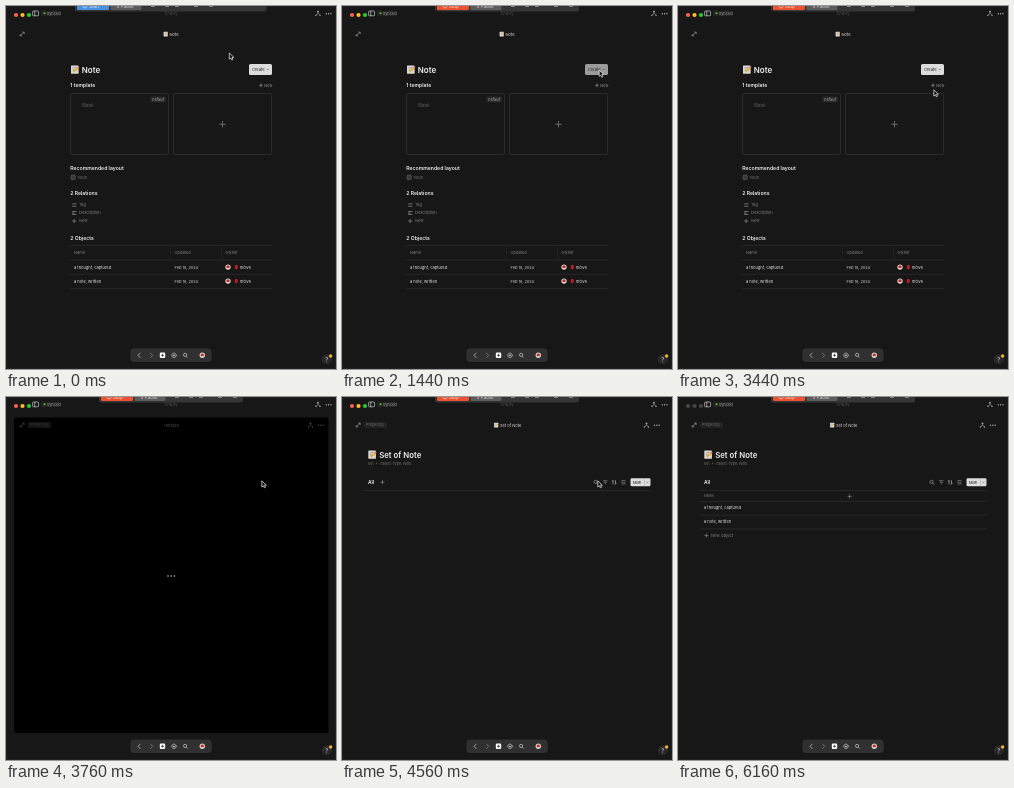
Write an HTML page that moves like this. It is 330 px wide and 363 px high and loops after 6.24 s.

```html
<!DOCTYPE html>
<html lang="en">
<head>
<meta charset="utf-8">
<title>Notes</title>
<style>
html, body { margin: 0; width: 100%; height: 100%; overflow: hidden; background: #171717; }
svg { display: block; width: 330px; height: 363px; font-family: Inter, sans-serif; }
text { white-space: pre; }
</style>
</head>
<body>
<svg id="stage" viewBox="0 0 330 363"></svg>
<script>
const LOOP = 6240, STEP = 80;
const stage = document.getElementById('stage');

const text = (x, y, s, size = 4, fill = '#888', more = '') =>
  `<text x="${x}" y="${y}" font-size="${size}" fill="${fill}" ${more}>${s}</text>`;
const bold = (x, y, s, size = 5.1) => text(x, y, s, size, '#eee', 'font-weight="600"');
const rect = (x, y, w, h, fill, r = 0, more = '') =>
  `<rect x="${x}" y="${y}" width="${w}" height="${h}" rx="${r}" fill="${fill}" ${more}/>`;
const dot = (x, y, r, fill, more = '') => `<circle cx="${x}" cy="${y}" r="${r}" fill="${fill}" ${more}/>`;
const line = (d, color = '#888', w = .7) => `<path d="${d}" fill="none" stroke="${color}" stroke-width="${w}"/>`;
const rule = (x1, x2, y) => line(`M${x1} ${y}H${x2}`, '#2b2b2b', .8);
const plus = (x, y, r, color) => line(`M${x - r} ${y}h${2 * r}M${x} ${y - r}v${2 * r}`, color);
const dots = (x, y, color) => [0, 2.3, 4.6].map(d => dot(x + d, y, .7, color)).join('');
const group = (id, body) => `<g id="${id}">${body}</g>`;

const memo = (x, y, s) => `<g transform="translate(${x} ${y}) scale(${s / 9})">` +
  rect(.5, .5, 7.6, 8.3, '#ddd9d2', .6) + line('M2 2.4h4M2 4h3M2 5.6h2', '#8b8b8b', .6) +
  line('M3.2 7L7.7 2.6', '#e9a82c', 1.7) + line('M7.2 3L8.3 2', '#e66a62', 1.7) + '</g>';
const tree = (x, y, color) => line(`M${x} ${y - 1.5}V${y}L${x - 2} ${y + 2}M${x} ${y}L${x + 2} ${y + 2}`, color, .6) +
  dot(x, y - 1.6, .9, color) + dot(x - 2, y + 2, .7, color) + dot(x + 2, y + 2, .7, color);
const search = (x, y, color) => dot(x - .4, y - .4, 1.6, 'none', `stroke="${color}" stroke-width=".7"`) +
  line(`M${x + .8} ${y + .8}l1.5 1.5`, color);
const avatar = (x, y) => dot(x, y, 2.7, '#d9cfc4') + dot(x, y - .2, 1.6, '#c22a2a') + rect(x - 1, y + 1, 2, 1, '#efe6da');
const chevron = (x, y, color) => line(`M${x - 1} ${y - .5}l1 1l1-1`, color, .6);
const expand = line('M14.4 29.7L18 26.3M16.3 26.1h1.9v1.9M14.2 28v1.9h1.9', '#aaa', .6);

function toolbar(id, x, end, color, label) {
  return group(id, rect(x - 2, -5, end - x + 2, 10.5, '#363636', 2.5) + rect(x, -5, 32, 9, color, 1.5) +
    rect(x + 33.5, -5, 31, 9, '#5c5c5c', 1.5) + dot(x + 8, .2, 1.8, 'none', 'stroke="#eee" stroke-width=".6"') +
    text(x + 12, 1.6, label, 4.5, '#eee') + text(x + 40, 1.6, 'II Pause', 4.5, '#ddd') +
    [74, 88, 98, 117, 132].map(d => rect(x + d, -1, 4, 2, '#888')).join(''));
}

const windowBar =
  rect(.25, .25, 329.5, 362.5, 'none', 3, 'stroke="#303030" stroke-width=".6"') +
  ['#ff5f57', '#febc2e', '#28c840'].map((c, i) => dot(10 + i * 6.5, 9, 2.1, c, 'class="light"')).join('') +
  rect(26.6, 5, 6, 4.8, 'none', 1, 'stroke="#ccc" stroke-width=".7"') + line('M28.8 5v5', '#ccc') +
  rect(35, 4.7, 20, 5.2, '#242424', 1.2) + dot(38.5, 7.3, 1, '#5bc20f') + text(40.7, 8.7, 'Synced', 3.9, '#999') +
  text(158.5, 9, 'Empty', 4.4, '#4b4b4b') + tree(312, 7.3, '#aaa') + dots(320.3, 7.7, '#aaa');

const notePage = expand + memo(157.3, 25.5, 5) + text(163.5, 29.6, 'Note', 4.1, '#ddd') +
  memo(64.5, 59, 9) + bold(75.8, 66.8, 'Note', 8) +
  rect(243, 58, 23, 11, '#dcdcdc', 1.5, 'id="create"') + text(246, 65, 'Create', 4, '#222') + chevron(261.7, 63.5, '#555') +
  bold(64.3, 81.2, '1 template') + plus(255, 79.3, 2, '#888') + text(258.2, 80.8, 'New', 3.9) +
  [64.5, 167.5].map(x => rect(x, 87.5, 98, 61, 'none', 1.5, 'stroke="#303030" stroke-width=".8"')).join('') +
  text(76, 101.3, 'Blank', 4.4, '#606060') + rect(144.5, 90.5, 15.5, 6, '#292929', 1) +
  text(146, 94.8, 'Default', 3.7, '#999') + plus(216.5, 118.3, 3.3, '#888') +
  bold(64.3, 163.6, 'Recommended layout') +
  rect(65.2, 169.2, 4, 4.2, 'none', .8, 'stroke="#888" stroke-width=".6"') + line('M66.2 170.8h2M66.2 172h2', '#888', .5) +
  text(72, 172.8, 'Note', 4, '#707070') + bold(64.3, 189.4, '2 Relations') +
  line('M66.2 197.5h4.2M66.2 199h4.2M66.2 200.5h4.2', '#777', .6) + line('M66 205.5h4.5M66 207h3M66 208.5h4.5', '#888') +
  plus(68.2, 215, 2.1, '#888') + ['Tag', 'Description', 'New'].map((s, i) => text(73, 200.4 + i * 8, s, 4, '#808080')).join('') +
  bold(64.3, 234, '2 Objects') + [239.5, 254, 268.2, 282.6].map(y => rule(64, 266, y)).join('') +
  line('M164.5 241v12M215.3 241v12', '#242424') +
  [['Name', 68], ['Updated', 168.5], ['Owner', 219.3]].map(([s, x]) => text(x, 248.3, s, 4, '#808080')).join('') +
  ['a thought, captured', 'a note, written'].map((s, i) => {
    const y = 262.6 + i * 14;
    return text(68, y, s, 4, '#e2e2e2') + text(168.5, y, 'Feb 16, 2024', 3.9, '#ccc') + avatar(222, y - 1.5) +
      `<ellipse cx="230.3" cy="${y - 1.5}" rx="1.6" ry="2.4" fill="#b51d25"/>` + text(233.7, y, 'mólve', 4, '#ddd');
  }).join('');

const menu = rect(222, 73, 64.5, 18.5, '#292929', 1, 'stroke="#3b3b3b" stroke-width=".6"') +
  rect(222.3, 73.3, 63.9, 8.3, '#4c4c4c', .6, 'id="pick"') +
  text(226.6, 78.9, 'New Object', 4, '#eee') + text(226.6, 87, 'New Set of Objects', 4, '#e0e0e0');

const loading = rect(8, 20.5, 314.5, 315.5, '#000', 2) + `<g opacity=".45">${expand}` +
  rect(22, 25, 23, 6, '#2a2a2a', 1.2) + text(24, 29.4, 'Preparing…', 3.8, '#777') + tree(304.5, 28, '#999') +
  dots(312.5, 28.2, '#999') + text(158, 29.5, 'Untitled', 4, '#aaa') + '</g>' +
  [162, 165.2, 168.4].map(x => dot(x, 179, .9, '#777', 'class="wait"')).join('');

const setPage = expand + rect(22, 25, 23, 6, '#222', 1.2) + text(24, 29.4, 'Preparing…', 3.8, '#666') +
  tree(304.5, 28, '#aaa') + dots(312.5, 28.2, '#aaa') + memo(151.8, 25.5, 5) + text(158, 29.6, 'Set of Note', 4, '#ddd') +
  memo(25.8, 53, 9) + bold(37.2, 60.5, 'Set of Note', 7.8) + text(26, 68, 'Set  •  Object Type: Note', 3.7, '#747474') +
  bold(26, 87, 'All', 4.9) + group('add', plus(40.5, 85.2, 2, '#888')) + search(254, 85.3, '#999') +
  line('M261.2 83.8h4.2M262 85.3h2.6M262.8 86.8h1', '#999') +
  line('M271 87.3v-4l-1 1M273.4 83.3v4l1-1', '#bbb') + line('M279.3 83.6h4.2M279.3 85.3h4.2M279.3 87h4.2', '#888') +
  rect(288.5, 81.3, 20, 8, '#dcdcdc', 1.3) + text(290.7, 86.7, 'New', 3.9, '#222') +
  line('M302.5 81.3v8', '#aaa', .5) + chevron(305.5, 85.3, '#555') + rule(22, 309, 93.5);

const rows = text(26, 100.2, 'Name', 3.7, '#777') + plus(171.6, 99.4, 2, '#888') +
  [104.5, 118.2, 132].map(y => rule(22, 309, y)).join('') +
  text(26, 112.3, 'a thought, captured', 4, '#e2e2e2') + text(26, 126.2, 'a note, written', 4, '#e2e2e2') +
  plus(28.4, 138.6, 2, '#888') + text(33, 140, 'New Object', 4, '#808080');

const dock = rect(124.3, 342.5, 81.4, 13.5, '#303030', 4) +
  line('M134.4 346.8l-2.4 2.5l2.4 2.5', '#ccc') + line('M144.2 346.8l2.4 2.5l-2.4 2.5', '#888') +
  rect(153.8, 346.6, 5.4, 5.4, '#fff', 1.2) + plus(156.5, 349.3, 1.5, '#222') +
  dot(168, 349.3, 2.2, 'none', 'stroke="#ccc" stroke-width="1" stroke-dasharray="1.3 .45"') +
  dot(168, 349.3, .9, '#ccc') + search(179.5, 349.3, '#ccc') + avatar(196.3, 349.3) +
  dot(320.8, 353.2, 5, '#292929') + text(319.2, 355.6, '?', 6, '#ccc') + dot(324.6, 350, 1.7, '#f0b429');

const pointer = '<path d="M0 0V6.2L1.5 4.9L2.5 7L3.7 6.5L2.7 4.4H4.6Z" fill="#111" stroke="#eee" stroke-width=".7" stroke-linejoin="round"/>';

stage.innerHTML = rect(0, 0, 330, 363, '#171717') + windowBar + group('note', notePage) + group('menu', menu) +
  group('loading', loading) + group('set', setPage) + group('rows', rows) + dock +
  toolbar('idle', 71, 260.5, '#4a90e2', 'Start') + toolbar('record', 95, 237, '#ee5130', 'Stop') + group('cursor', pointer);

const el = id => document.getElementById(id);
const show = (id, on) => el(id).setAttribute('display', on ? 'inline' : 'none');
const lights = [...document.querySelectorAll('.light')];
const lightColors = lights.map(c => c.getAttribute('fill'));
const waits = [...document.querySelectorAll('.wait')];

// Each move: start, end, target x, target y
const moves = [
  [720, 1440, 257.2, 64.2],
  [1600, 1920, 256.7, 76.6],
  [2400, 2720, 255.8, 83.8],
  [5200, 5600, 110, -9]
];
function cursorAt(t) {
  let x = 223.3, y = 47;
  for (const [from, to, tx, ty] of moves) {
    const p = Math.min(1, Math.max(0, (t - from) / (to - from)));
    const k = p * p * (3 - 2 * p);
    x += (tx - x) * k;
    y += (ty - y) * k;
  }
  return [x, y];
}

function draw(now) {
  const t = Math.floor((now % LOOP) / STEP) * STEP;
  const [x, y] = cursorAt(t);
  show('idle', t < 80);
  show('record', t >= 80);
  show('note', t < 3760);
  show('menu', t >= 1680 && t < 2880);
  show('loading', t >= 3760 && t < 4560);
  show('set', t >= 4560);
  show('rows', t >= 4720);
  show('add', t < 5360);
  show('cursor', t < 5600);
  el('cursor').setAttribute('transform', `translate(${x} ${y})`);
  el('create').setAttribute('fill', t >= 1360 && t < 3440 ? '#9b9b9b' : '#dcdcdc');
  el('pick').setAttribute('y', y > 80 ? 82.6 : 73.3);
  el('pick').setAttribute('opacity', t >= 1760 ? 1 : 0);
  lights.forEach((c, i) => c.setAttribute('fill', t >= 5840 ? '#454545' : lightColors[i]));
  waits.forEach((c, i) => c.setAttribute('opacity', t >= 4160 && i > 0 && (t >= 4240 || i === 1) ? .8 : 1));
  requestAnimationFrame(draw);
}
draw(performance.now());
</script>
</body>
</html>
```
